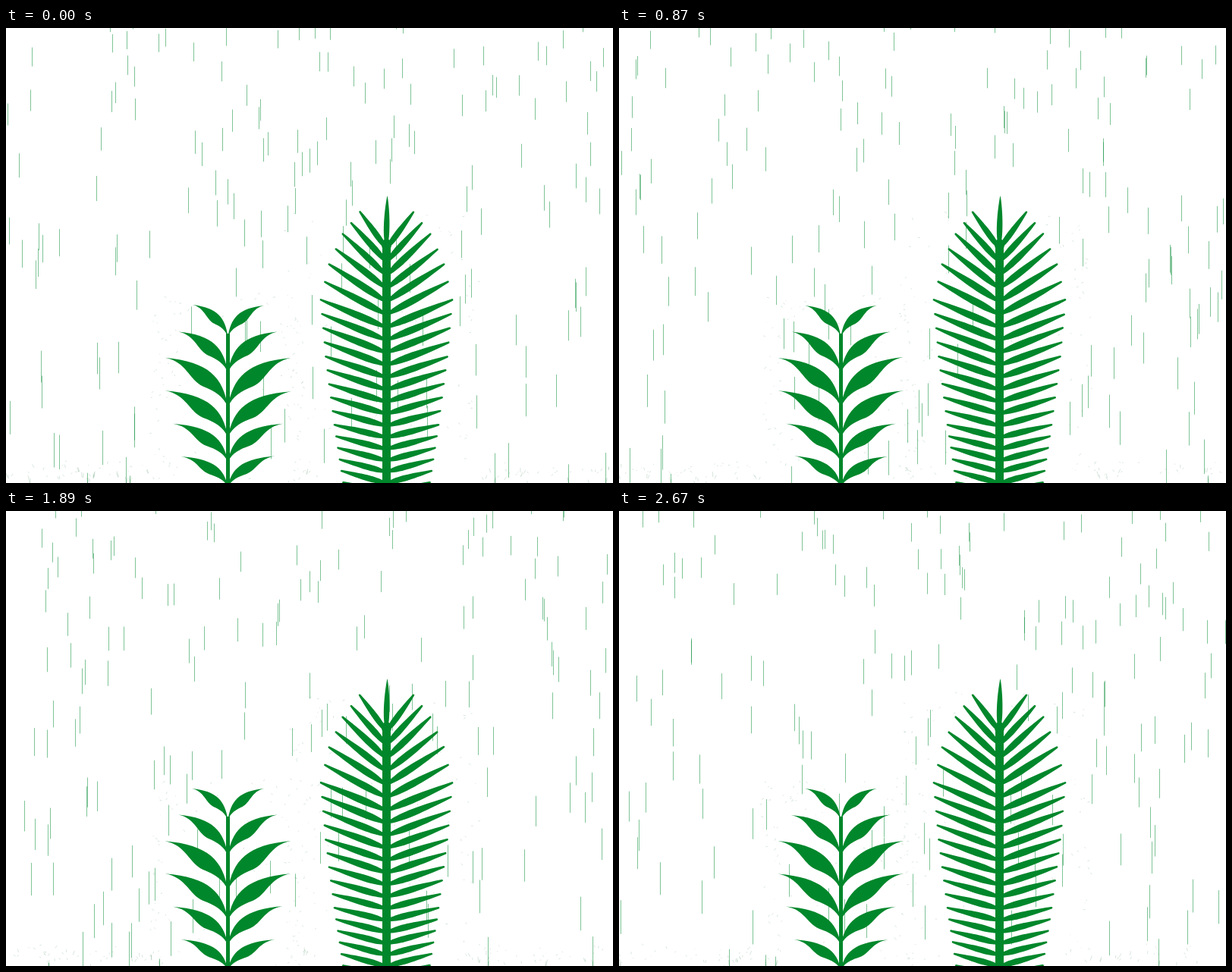
Animation of 800 by 600 pixels, one loop 2700 ms. Source, as an HTML page with a canvas:

```html
<!DOCTYPE html>
<html lang="en">
<head>
<meta charset="utf-8">
<title>Rain on plants</title>
<style>
  html, body { margin: 0; width: 100%; height: 100%; overflow: hidden; background: #fff; }
  canvas { display: block; }
</style>
</head>
<body>
<canvas id="stage" width="800" height="600"></canvas>
<script>
const ctx = document.getElementById('stage').getContext('2d');
const STEP = 30, FRAMES = 90, GRAVITY = 1.395, START_Y = -200, GREEN = '#00872b';
const FALL = Math.ceil(Math.sqrt(2 * (600 - START_Y) / GRAVITY));

let seed = 20;
function random() {
  seed = (seed + 0x6D2B79F5) | 0;
  let h = Math.imul(seed ^ (seed >>> 15), 1 | seed);
  h = (h + Math.imul(h ^ (h >>> 7), 61 | h)) ^ h;
  return ((h ^ (h >>> 14)) >>> 0) / 4294967296;
}
const between = (low, high) => low + (high - low) * random();

// Value at i on a line through [i, value] points
function along(points, i) {
  const k = Math.max(1, points.findIndex(p => p[0] >= i));
  const [i0, a] = points[k - 1], [i1, b] = points[k];
  return a + (b - a) * (i - i0) / (i1 - i0);
}

const broad = {
  x: 292.5, left: 188, right: 396, top: 347, sway: 0.02, count: 6,
  reach: i => along([[0, 47.5], [2, 83], [3, 83], [5, 62]], i),
  tip: i => along([[0, 366], [2, 435], [5, 565]], i),
  base: i => broad.tip(i) + broad.reach(i) * (0.87 - 0.045 * i)
};
const palm = {
  x: 501.5, left: 370, right: 622, top: 237, sway: 0.01, count: 21,
  reach: i => along([[0, 36], [2, 58.5], [4, 76.5], [6, 87.5], [10, 81], [20, 58]], i),
  tip: i => along([[0, 242], [2, 271], [4, 311], [6, 358], [10, 433], [15, 523], [20, 599]], i),
  base: i => 291 + 17.8 * i - 0.08 * i * i
};
const plants = [broad, palm];

const drops = [], splashes = [];
for (let birth = -FALL - 12; birth < FRAMES; birth++) {
  for (let i = 0; i < 10; i++) {
    const drop = { x: Math.floor(between(0, 800)) + 0.5, birth: birth + random(), end: 600 };
    const plant = plants.find(p => Math.abs(drop.x - p.x) < (p.right - p.left) * 0.36);
    if (plant && random() < 0.75) drop.end = between(plant.top, 620);
    drops.push(drop);
    if (plant) continue;
    for (let k = 0; k < 2; k++) {
      splashes.push({ x: drop.x, y: 600, vx: between(-2.5, 2.5), vy: between(-9, -5),
        gravity: GRAVITY, birth: birth + FALL, life: 8, alpha: 0.25 });
    }
  }
}
for (const p of plants) {
  const rx = (p.right - p.left) / 2;
  for (let birth = -6; birth < FRAMES; birth++) {
    for (let i = 0; i < 46; i++) {
      const x = between(p.left + 6, p.right - 6), y = between(p.top + 6, 600);
      const inside = Math.hypot((x - p.x) / (rx * 0.72), Math.min(0, y - p.top - 110) / 110) < 1;
      if (inside && random() < 0.85) continue;
      splashes.push({ x, y, vx: Math.sign(x - p.x) * between(0, 3), vy: between(-3, 2),
        gravity: 0.3, birth, life: 5, alpha: 0.25 });
    }
  }
}

function line(x1, y1, x2, y2) {
  ctx.beginPath();
  ctx.moveTo(x1, y1);
  ctx.lineTo(x2, y2);
  ctx.stroke();
}

function drawRain(frame) {
  ctx.lineWidth = 1;
  ctx.strokeStyle = 'rgba(0,138,48,.5)';
  for (const d of drops) {
    const age = frame - d.birth;
    const y = START_Y + GRAVITY * age * age / 2;
    if (age > 0 && y < d.end) line(d.x, y, d.x, y + GRAVITY * age);
  }
  ctx.lineWidth = 0.7;
  for (const s of splashes) {
    const age = frame - s.birth;
    if (age < 0 || age >= s.life) continue;
    const x = s.x + s.vx * age, y = s.y + s.vy * age + s.gravity * age * age / 2;
    ctx.strokeStyle = `rgba(30,110,60,${s.alpha})`;
    line(x, y, x + s.vx, y + s.vy + s.gravity * age);
  }
}

function broadLeaf(w, h) {
  ctx.scale(w, -h);
  ctx.moveTo(0, 0);
  ctx.bezierCurveTo(0.08, 0.6, 0.3, 0.92, 1, 1);
  ctx.bezierCurveTo(0.66, 0.92, 0.62, 0.55, 0.4, 0.42);
  ctx.bezierCurveTo(0.2, 0.32, 0.08, 0.22, 0, 0);
}

function palmLeaf(w, h) {
  const length = Math.hypot(w, h), bulge = 2.7 + length * 0.034;
  ctx.rotate(-Math.atan2(h, w));
  ctx.moveTo(0, -1.5);
  ctx.bezierCurveTo(0.25 * length, -bulge, 0.4 * length, -bulge, length - 1, -1.3);
  ctx.arc(length - 1, 0, 1.3, -Math.PI / 2, Math.PI / 2);
  ctx.bezierCurveTo(0.4 * length, bulge, 0.25 * length, bulge, 0, 1.5);
}

// A short nudge that dies away, different for every leaf
function nudge(leaf, frame) {
  const time = frame + leaf * 5.3, hit = Math.floor(time / 9);
  const noise = Math.sin(hit * 127.1 + leaf * 311.7) * 43758.5;
  return ((noise - Math.floor(noise)) * 2 - 1) ** 3 * Math.exp(-(time - hit * 9) / 4);
}

function drawLeaves(plant, shape, frame) {
  for (let i = 0; i < plant.count; i++) {
    for (const side of [-1, 1]) {
      ctx.save();
      ctx.translate(plant.x, plant.base(i));
      ctx.scale(side, 1);
      ctx.rotate(plant.sway * nudge(i * 2 + (side + 1) / 2, frame));
      ctx.beginPath();
      shape(plant.reach(i), plant.base(i) - plant.tip(i));
      ctx.fill();
      ctx.restore();
    }
  }
}

function drawPlants(frame) {
  ctx.fillStyle = GREEN;
  drawLeaves(broad, broadLeaf, frame);
  ctx.fillRect(broad.x - 2.5, 403, 5, 197);
  drawLeaves(palm, palmLeaf, frame);
  ctx.fillRect(palm.x - 5.5, 286, 11, 314);
  ctx.beginPath();
  ctx.ellipse(palm.x, 286, 6.5, 8, 0, 0, Math.PI * 2);
  ctx.moveTo(502.5, 221);
  ctx.bezierCurveTo(505, 232, 507, 264, 504, 282);
  ctx.lineTo(499, 282);
  ctx.bezierCurveTo(496, 264, 500, 232, 502.5, 221);
  ctx.fill();
}

function draw() {
  const frame = Math.floor(performance.now() / STEP) % FRAMES;
  ctx.fillStyle = '#fff';
  ctx.fillRect(0, 0, 800, 600);
  drawRain(frame);
  drawPlants(frame);
  requestAnimationFrame(draw);
}
draw();
</script>
</body>
</html>
```
